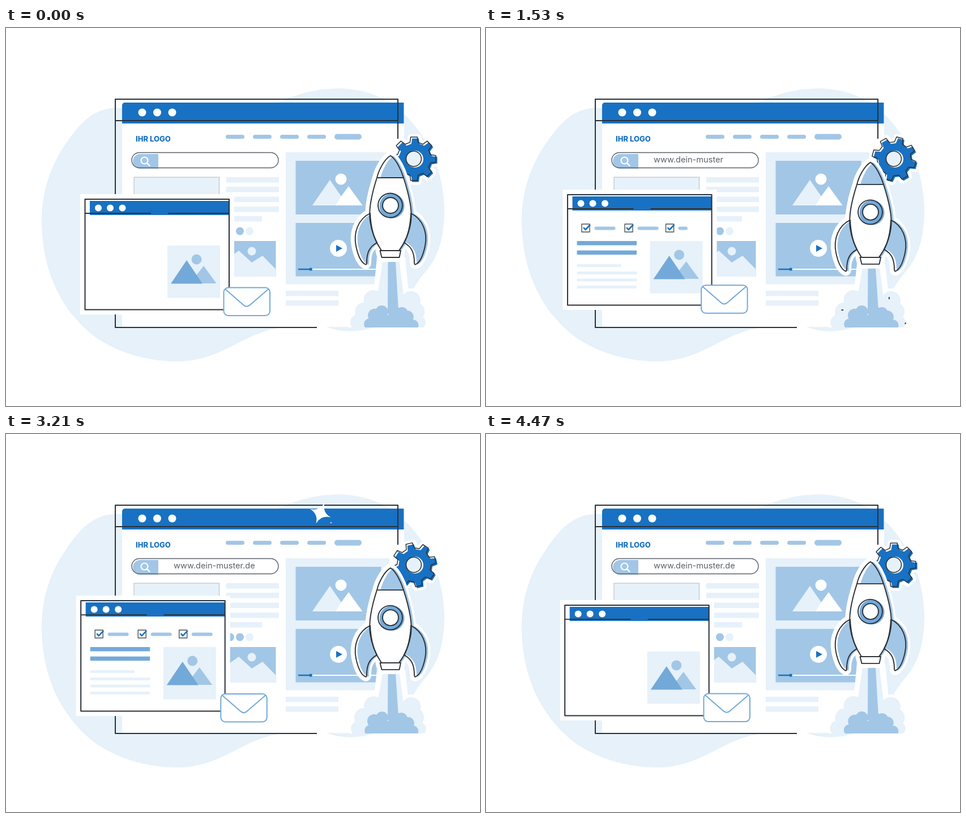
Recreate the animation shown at these times as an HTML page with a canvas. Size 837 by 669 pixels, loop 4.5 s.

```html
<!DOCTYPE html>
<html lang="de">
<head>
<meta charset="utf-8">
<title>Website-Start</title>
<style>
html, body { margin: 0; width: 100%; height: 100%; overflow: hidden; background: #fff; }
canvas { display: block; width: 837px; height: 669px; }
</style>
</head>
<body>
<canvas id="stage" width="837" height="669"></canvas>
<script>
const ctx = document.getElementById('stage').getContext('2d');
const LOOP = 4500;
const BLUE = '#1871c2', MID = '#73a9d9', SOFT = '#a2c6e6', PALE = '#e6f1fa', INK = '#2b3036', WHITE = '#fff';
const ADDRESS = 'www.dein-muster.de';

const clamp = v => Math.max(0, Math.min(1, v));
const span = (t, start, length) => clamp((t - start) / length);

// Smooth periodic curve through [time, value] keys.
function track(t, keys) {
  const n = keys.length;
  const key = i => {
    const turn = Math.floor(i / n), [time, value] = keys[i - turn * n];
    return [time + turn * LOOP, value];
  };
  let i = n - 1;
  while (keys[i][0] > t) i--;
  const [a, b, c, d] = [key(i - 1), key(i), key(i + 1), key(i + 2)];
  const len = c[0] - b[0], u = (t - b[0]) / len;
  const m0 = (c[1] - a[1]) / (c[0] - a[0]) * len;
  const m1 = (d[1] - b[1]) / (d[0] - b[0]) * len;
  return (2*u**3 - 3*u*u + 1) * b[1] + (u**3 - 2*u*u + u) * m0
    + (3*u*u - 2*u**3) * c[1] + (u**3 - u*u) * m1;
}

function fill(path, color) { ctx.fillStyle = color; ctx.fill(path); }
function stroke(path, color = INK, width = 2) {
  ctx.strokeStyle = color;
  ctx.lineWidth = width;
  ctx.stroke(path);
}
function box(x, y, w, h, color) { ctx.fillStyle = color; ctx.fillRect(x, y, w, h); }
function circle(x, y, r) { const p = new Path2D(); p.arc(x, y, r, 0, 2 * Math.PI); return p; }
function round(x, y, w, h, r) { const p = new Path2D(); p.roundRect(x, y, w, h, r); return p; }
const dot = (x, y, r, color) => fill(circle(x, y, r), color);
const shape = (d, color) => fill(new Path2D(d), color);
const line = (d, color, width) => stroke(new Path2D(d), color, width);
function at(x, y, draw) { ctx.save(); ctx.translate(x, y); draw(); ctx.restore(); }

function star(x, y, r, turn) {
  if (r <= 0) return;
  at(x, y, () => {
    ctx.rotate(turn);
    const p = new Path2D();
    p.moveTo(r, 0);
    for (let i = 1; i <= 4; i++) {
      const a = i * Math.PI / 2, mid = a - Math.PI / 4;
      p.quadraticCurveTo(r * .17 * Math.cos(mid), r * .17 * Math.sin(mid), r * Math.cos(a), r * Math.sin(a));
    }
    fill(p, WHITE);
  });
}
function twinkle(t, start, length, x, y, r, turn) {
  const u = span(t, start, length);
  star(x, y, r * Math.sin(Math.PI * u), turn + (u - .5) * .5);
}

// Draws the part of a path between its tail and its head.
function trimmed(d, length, u, color, width) {
  const head = clamp(u * 4), tail = clamp(u * 4 - 3);
  if (head <= tail) return;
  ctx.save();
  ctx.setLineDash([(head - tail) * length, 500]);
  ctx.lineDashOffset = -tail * length;
  line(d, color, width);
  ctx.restore();
}

function background() {
  box(0, 0, 837, 669, WHITE);
  shape('M205 142C170 139 145 152 117 189C82 234 63 283 63 343C64 440 105 510 165 552C210 580 260 591 310 590C380 587 415 543 480 531C530 522 553 525 572 531C600 541 635 537 662 525C705 505 715 458 742 430C769 397 774 360 774 317C772 270 758 220 728 181C697 139 655 107 585 107C545 108 516 116 480 132L480 200L205 200Z', PALE);
}

function mainWindow(t) {
  box(205, 140, 498, 389, WHITE);
  fill(round(205, 132, 497.5, 37, [5, 0, 0, 0]), BLUE);
  [240.5, 267, 293.5].forEach(x => dot(x, 149.5, 7, WHITE));
  line('M549 530H193V126H692V196M193 164H692');

  ctx.fillStyle = BLUE;
  ctx.font = '800 13px Inter, sans-serif';
  ctx.fillText('IHR LOGO', 229, 200.5);
  [388, 436, 484, 532].forEach(x => fill(round(x, 189, 33, 7, 3.5), SOFT));
  fill(round(580, 187.5, 48, 10, 5), SOFT);

  fill(round(224, 223, 45, 26, [13, 0, 0, 13]), SOFT);
  stroke(round(222, 220.5, 259, 27, 13.5), '#5b6066', 1.4);
  stroke(circle(244.5, 234.5, 6), WHITE, 2.2);
  line('M249 239L254 244', WHITE, 2.5);
  addressText(t);

  box(226, 264, 151, 180, PALE);
  ctx.strokeStyle = '#b5bac0';
  ctx.lineWidth = 1;
  ctx.strokeRect(226, 264, 150.5, 180);
  [264, 281, 298.5, 316].forEach(y => box(389, y, 93, 9.5, PALE));
  box(389, 333, 63, 9.5, PALE);
  dot(396, 359.5, 7, SOFT);
  dot(413, 359.5, 7, SOFT);
  dot(430, 359.5, 7, PALE);
  box(389, 377, 87.5, 63, SOFT);
  shape('M389 410L411 394L434 415L453 403L476.5 427V440H389Z', PALE);
  dot(434, 395, 7.5, PALE);

  box(494, 220, 183, 233.5, PALE);
  box(511.5, 235, 151, 95, SOFT);
  box(511.5, 345, 151, 94.5, SOFT);
  shape('M541 314L572 269L603 314Z', PALE);
  shape('M580 314L605 280L629.5 314Z', WHITE);
  shape('M572 269L541 314H582L591 299Z', PALE);
  dot(591.5, 267.5, 10, WHITE);
  dot(587, 390, 15, WHITE);
  shape('M583 384L594 390L583 396Z', BLUE);
  line('M538 427H662', WHITE, 2);
  line('M516 427H538', BLUE, 2.5);
  dot(538, 427, 2.8, BLUE);
  box(494, 465, 93, 9.5, PALE);
  box(494, 482, 93, 9.5, PALE);
}

function addressText(t) {
  const typed = ADDRESS.slice(0, Math.floor(t / 102));
  const blink = t % 1080;
  ctx.font = '400 14.6px Inter, sans-serif';
  ctx.fillStyle = '#5b6066';
  ctx.fillText(typed, 296, 238);
  if (blink > 460 && blink < 860)
    box(297 + ctx.measureText(typed).width, 226.5, 1.2, 13, '#5b6066');
}

function smallWindow(t) {
  const x = track(t, [[0, 0], [510, 5], [1140, 6.3], [1950, 1.8], [2670, -3.7], [3240, -7.4], [3690, -7]]);
  const y = track(t, [[0, 0], [510, 0], [1140, -5.7], [1950, -9.7], [2670, -10.5], [3690, -5]]);
  const leave = 1 - span(t, 4050, 300);
  const grow = (start, length) => span(t, start, length) * leave;

  at(x, y, () => {
    box(131, 294, 272, 213, WHITE);
    box(148, 306, 246, 25, BLUE);
    [163, 184, 205.5].forEach(cx => dot(cx, 318.5, 6, WHITE));
    stroke(round(139.5, 303, 254.5, 195.5, 0));
    line('M139 328H256M286 328H394', INK, 1.8);

    box(285, 385, 93, 92.5, PALE);
    shape('M325 452L349 421L371.5 452Z', SOFT);
    shape('M291 452.5L319 411L347 452.5Z', MID);
    dot(336.5, 409.5, 9, SOFT);

    [[164.5, 187, 100], [240.5, 263, 700], [313, 335, 1300]].forEach(([cx, px, start]) => {
      const size = grow(start, 150), tick = grow(start + 80, 150), pill = grow(start + 120, 250);
      if (size > 0) at(cx + 7, 362, () => {
        ctx.scale(size, size);
        stroke(round(-7, -7, 14, 14, 0), '#4a4f55', 1.4);
      });
      if (tick > 0) {
        ctx.save();
        ctx.setLineDash([20 * tick, 50]);
        line(`M${cx + 3} 361L${cx + 6.5} 365L${cx + 15} 356`, BLUE, 2.6);
        ctx.restore();
      }
      if (pill > 0) fill(round(px, 359.5, 37 * pill, 6, 3), SOFT);
    });
    box(156, 385, 105.5 * grow(150, 460), 7.5, MID);
    box(156, 401.7, 105.5 * grow(350, 460), 7.5, MID);
    [[426, 78, 150], [439, 106, 215], [451.5, 106, 300], [464, 105, 400]]
      .forEach(([ly, w, start]) => box(156, ly, w * grow(start, 460), 5, PALE));
    twinkle(t, 200, 700, 336, 317, 14.5, .2);
    twinkle(t, 300, 600, 363, 318.5, 8.5, .25);
  });
}

function envelope(t) {
  const x = track(t, [[0, 0], [510, .3], [1140, -1.5], [1950, -7.3], [2670, -8.5], [3690, -2]]);
  const y = track(t, [[0, 0], [510, -1], [1140, -3.5], [1950, -4.3], [2670, -.3], [3690, .5]]);
  at(x, y, () => {
    const body = round(384.5, 459.5, 81.5, 49.5, 8);
    fill(body, WHITE);
    stroke(body, MID, 2);
    line('M387 462L419 490Q425 495.5 431 490L463.5 462', MID, 2);
  });
}

function gearPath() {
  const p = new Path2D(), teeth = 8, step = 2 * Math.PI / teeth;
  for (let i = 0; i < teeth; i++)
    [[-.31, 30], [-.19, 39], [.19, 39], [.31, 30]].forEach(([off, r]) => {
      const a = (i + off) * step;
      p.lineTo(r * Math.cos(a), r * Math.sin(a));
    });
  p.closePath();
  return p;
}
const gearShape = gearPath();

function gear(t) {
  const turned = (x, y, draw) => at(x, y, () => { ctx.rotate(t / LOOP * Math.PI / 4); draw(); });
  turned(721.5, 232.5, () => { fill(gearShape, WHITE); stroke(gearShape, WHITE, 13); });
  turned(723, 234, () => fill(gearShape, BLUE));
  turned(720.5, 231.5, () => stroke(gearShape, INK, 1.5));
  dot(722, 232, 15, WHITE);
  dot(720, 231.5, 13.5, PALE);
  stroke(circle(720, 231.5, 13.5), INK, 1.6);
}

const body = new Path2D('M679 226C668 232 658 252 655 265C645 296 640 322 643 342C646 364 653 379 663 394H694C705 379 712 364 715 342C718 322 712 296 702 265C698 252 689 232 679 226Z');
const nose = new Path2D('M679 226C668 232 659 252 656 265H702C698 252 689 232 679 226Z');
const leftFin = new Path2D('M643 328C622 338 613 362 618 386C621 400 626 414 634 418Q637 420 637 415C637 397 642 387 655 380C648 367 644 350 643 328Z');
const rightFin = new Path2D('M715 328C736 338 745 362 740 386C737 400 732 414 724 418Q721 420 721 415C721 397 716 387 703 380C710 367 714 350 715 328Z');
const nozzle = new Path2D('M660.5 394H697L694.5 406H663.5Z');

function cloud(puffs, base, color, t, halo) {
  const p = new Path2D();
  puffs.forEach(([x, y, r], i) => {
    const sway = Math.sin(2 * Math.PI * (t / 1500 + i * .37));
    p.addPath(circle(x + sway * 1.5, y + sway, r));
  });
  p.addPath(new Path2D(base));
  if (halo) stroke(p, WHITE, halo);
  fill(p, color);
}

function exhaust(t, drop) {
  ctx.save();
  ctx.beginPath();
  ctx.rect(560, 380, 220, 150);
  ctx.clip();
  const top = 406 + drop;
  shape(`M655 ${top}H705L715 510H645Z`, WHITE);
  cloud([[622, 521, 14], [632, 502, 17], [650, 482, 17], [714, 482, 17], [722, 502, 17], [730, 522, 12]],
    'M625 530L640 495L655 478H705L725 500L733 530Z', PALE, t, 10);
  shape(`M666 ${top}H694L705 500H652Z`, PALE);
  shape(`M674.5 ${top}H687.5L693 500H674Z`, SOFT);
  cloud([[642, 524, 10], [650, 508, 12], [665, 503, 11], [683, 500, 11], [699, 505, 11], [710, 512, 11], [717, 525, 10]],
    'M642 530L655 508H705L718 530Z', SOFT, t);
  ctx.restore();

  [[100, 1100], [1600, 1130]].forEach(([start, length]) =>
    trimmed('M662 441Q661 455 659 464', 24, span(t, start, length), INK, 1.8));
  trimmed('M674 474L673 486', 12, span(t, 1700, 700), INK, 1.8);
  trimmed('M684.5 443L686 465', 22, span(t, 1650, 700), WHITE, 2);
  trimmed('M686.5 477L688 496L692 498', 24, span(t, 3350, 700), WHITE, 2);
  [[300, 1300], [2200, 1000], [3620, 780]].forEach(([start, length]) => {
    const u = span(t, start, length);
    trimmed('M702 467Q709 467 711 472Q713 477 711 482', 19, u, INK, 1.8);
    trimmed('M618 508Q621 499 631 499', 17, u, INK, 1.8);
    trimmed('M739 510Q744 517 740 524', 15, u, INK, 1.8);
  });
}

function rocket(t) {
  const drop = track(t, [[0, 0], [510, 2], [1140, 8], [1950, 15.2], [2670, 16], [3690, 6]]);
  const parts = [body, leftFin, rightFin, nozzle];
  exhaust(t, drop);
  at(0, drop, () => {
    parts.forEach(p => stroke(p, WHITE, 16));
    parts.forEach(p => fill(p, WHITE));
    at(4, 0, () => { fill(leftFin, SOFT); fill(rightFin, SOFT); fill(body, SOFT); });
    fill(body, WHITE);
    fill(nozzle, WHITE);
    ctx.save();
    ctx.clip(body);
    at(5, 1, () => fill(nose, SOFT));
    ctx.restore();
    [leftFin, rightFin, body, nozzle].forEach(p => stroke(p, INK, 1.9));
    line('M656 265H702', INK, 1.8);
    dot(681.5, 315, 22, MID);
    dot(679, 314, 14, WHITE);
    stroke(circle(678.5, 314, 21.5), INK, 1.9);
    stroke(circle(679, 314, 14), INK, 1.9);
  });
}

function draw(t) {
  ctx.lineJoin = 'round';
  ctx.lineCap = 'butt';
  background();
  mainWindow(t);
  twinkle(t, 1550, 800, 534, 246, 20.5, .75);
  twinkle(t, 1700, 700, 520, 275, 4.5, .3);
  twinkle(t, 2850, 750, 555, 140, 20, .4);
  twinkle(t, 3150, 900, 574, 157, 8, .3);
  smallWindow(t);
  envelope(t);
  gear(t);
  rocket(t);
}

const begin = performance.now();
function tick() {
  draw((performance.now() - begin) % LOOP);
  requestAnimationFrame(tick);
}
tick();
</script>
</body>
</html>
```
